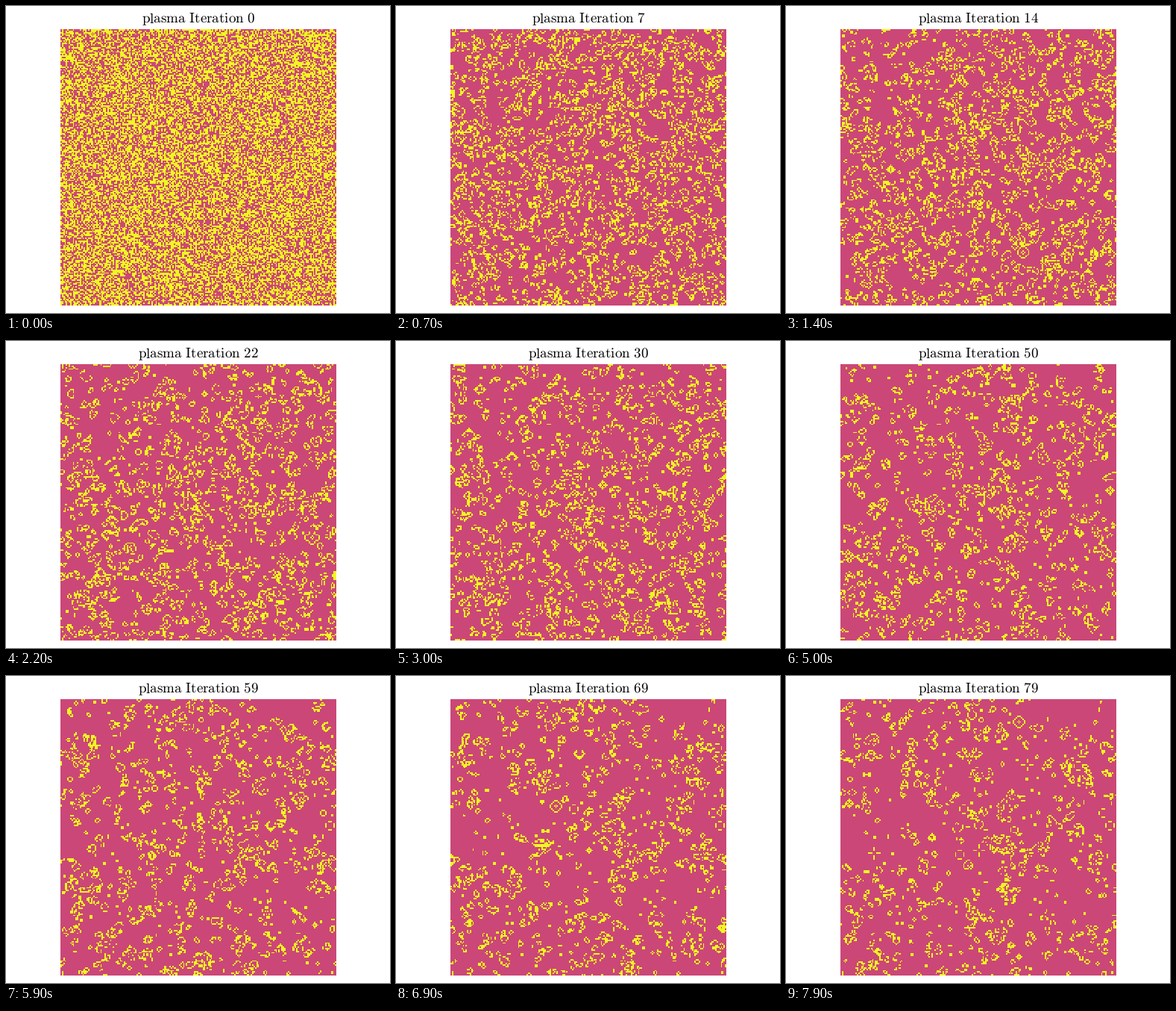
A matplotlib script that plays this animation: 515 by 411 pixels, repeating every 8 s.

```python
import numpy as np
import matplotlib.pyplot as plt
from matplotlib.animation import FuncAnimation

W, H, DPI = 515, 411, 64
CELLS = 200
FRAMES = 80
LEFT, BOTTOM, SIDE = 73, 10, 370
TITLE_PX = 19.03

plt.rcParams["mathtext.fontset"] = "cm"
plt.rcParams["text.hinting"] = "no_hinting"


def life_step(grid):
    """One Game of Life generation on a torus."""
    near = sum(np.roll(grid, (dy, dx), (0, 1))
               for dy in (-1, 0, 1) for dx in (-1, 0, 1) if dx or dy)
    return ((near == 3) | ((grid == 1) & (near == 2))).astype(int)


def title_text(i):
    return rf"$\mathrm{{plasma\ Iteration\ {i}}}$"


np.random.seed(42)
states = [np.random.randint(0, 2, (CELLS, CELLS))]
for _ in range(FRAMES - 1):
    states.append(life_step(states[-1]))

fig = plt.figure(figsize=(W / DPI, H / DPI), dpi=DPI, facecolor="white")
ax = fig.add_axes([LEFT / W, BOTTOM / H, SIDE / W, SIDE / H])
ax.axis("off")
image = ax.imshow(states[0], cmap="plasma", vmin=-1, vmax=1,
                  interpolation="nearest", aspect="auto")
title = fig.text((LEFT + SIDE / 2) / W, 1 - 22.7 / H, title_text(0),
                 ha="center", va="baseline", color="black",
                 fontsize=TITLE_PX * 72 / DPI)


def update(i):
    image.set_data(states[i])
    title.set_text(title_text(i))
    return image, title


anim = FuncAnimation(fig, update, frames=FRAMES, interval=100,
                     repeat=True, repeat_delay=0, blit=False)
plt.show()
```
